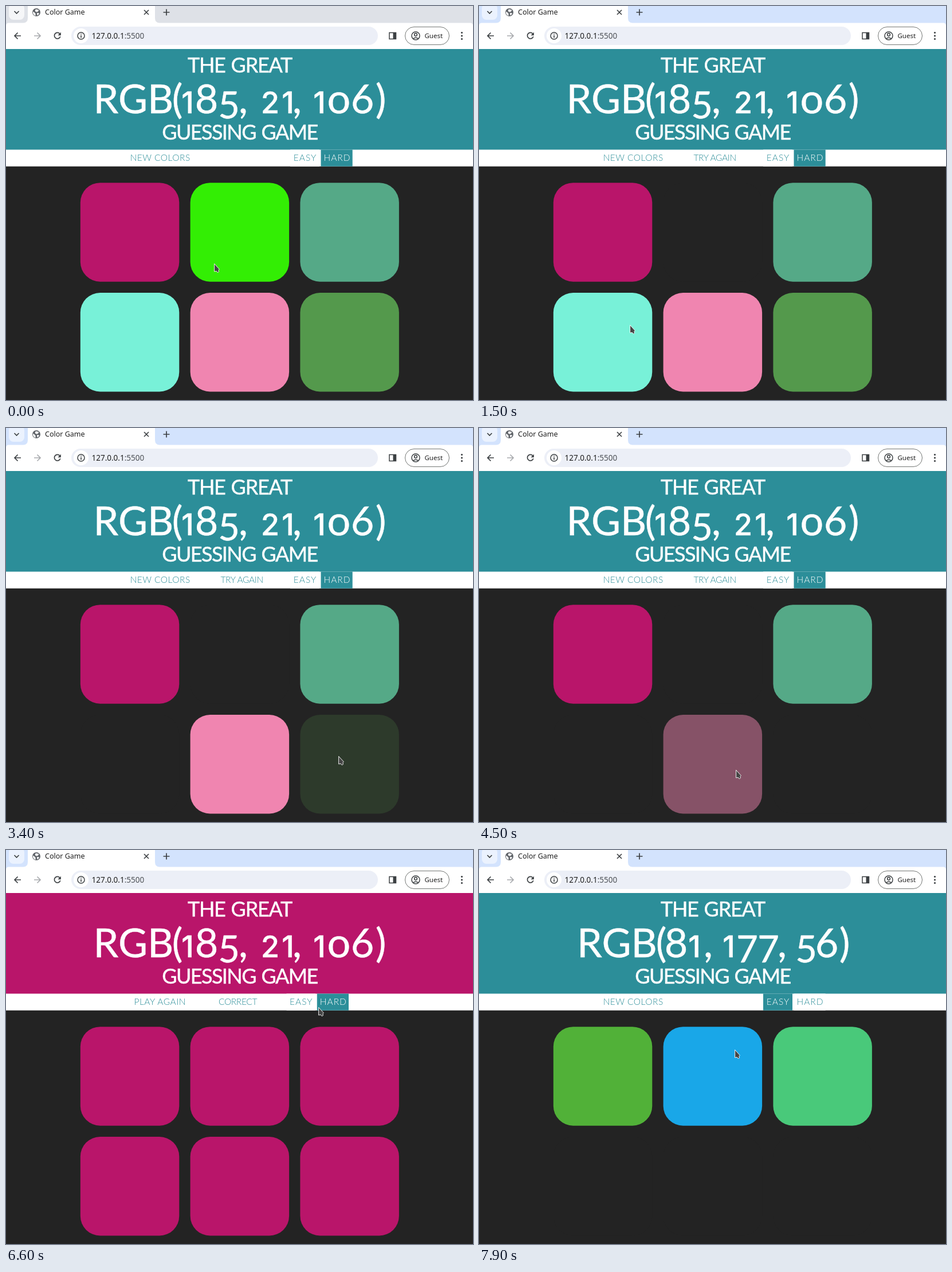
An HTML page for the animation above (8000 ms loop, 815 by 687 pixels).

```html
<!DOCTYPE html>
<html lang="en">
<head>
<meta charset="utf-8">
<title>Color Game</title>
<style>
  :root {
    --t: 0ms;
    --teal: #2c8e99;
    --dark: #232323;
    --win: rgb(185, 21, 106);
  }
  html, body { margin: 0; width: 100%; height: 100%; overflow: hidden; background: var(--dark); }
  svg { display: block; width: 815px; height: 687px; }
  text { font-family: "Noto Sans", "Open Sans", sans-serif; fill: #1f1f1f; white-space: pre; }

  /* Every animation is paused and placed by the shared clock in --t. */
  .a { animation: 8s step-end var(--t) infinite paused; }

  .head text, .nav text { font-family: Lato, "Open Sans", sans-serif; text-anchor: middle; }
  .head text { fill: #fff; stroke: #fff; stroke-width: .5; font-size: 36px; }
  .head .big { font-size: 70px; }
  .head .low { font: 500 52px Inter, "Open Sans", sans-serif; }
  .head .drop { font-size: 65px; }
  .head .round { font-size: 72px; }
  .nav text { fill: var(--teal); font-size: 15.5px; font-weight: 300; letter-spacing: .5px; }
  .nav .msg { letter-spacing: -.35px; }
  .nav .modes text { letter-spacing: 1px; }
  .icon { fill: none; stroke: #3c4043; stroke-width: 1.7; }

  .strip { animation-name: strip; }
  .chip { animation-name: chip; }
  .banner { animation-name: banner; }
  .first { animation-name: first; }
  .second { animation-name: second; }
  .idle { animation-name: idle; }
  .retry { animation-name: retry; }
  .won { animation-name: won; }
  .modes { animation-name: modes; }
  .easy { animation-name: easy; }
  .easyText { animation-name: easyText; }
  .hard { animation-name: hard; }
  .hardText { animation-name: hardText; }
  .pointer { animation-name: pointer; animation-timing-function: ease-in-out; }

  @keyframes strip { 0% { fill: #dee1e7 } 6.25%, to { fill: #d3e3fd } }
  @keyframes chip { 0% { fill: #f5f6f8 } 6.25%, to { fill: #ebf2fe } }
  @keyframes banner { 0%, 89.375%, to { fill: var(--teal) } 68.1125% { fill: var(--win) } }
  @keyframes first { 0% { opacity: 1 } 89.375%, to { opacity: 0 } }
  @keyframes second { 0% { opacity: 0 } 89.375%, to { opacity: 1 } }
  @keyframes idle { 0%, 89.375%, to { opacity: 1 } 68.1125% { opacity: 0 } }
  @keyframes retry { 0%, 68.1125%, to { opacity: 0 } 8.0625% { opacity: 1 } }
  @keyframes won { 0%, 89.375%, to { opacity: 0 } 68.1125% { opacity: 1 } }
  @keyframes modes {
    0%, 89.375%, to { transform: none }
    68.1125% { transform: translateX(-6.7px) }
  }
  @keyframes easy {
    0% { fill: #fff }
    85.5% { fill: #fff; animation-timing-function: ease }
    89.25%, to { fill: var(--teal) }
  }
  @keyframes easyText {
    0% { fill: var(--teal) }
    85.5% { fill: var(--teal); animation-timing-function: ease }
    89.25%, to { fill: #fff }
  }
  @keyframes hard {
    0% { fill: var(--teal) }
    89.375% { fill: var(--teal); animation-timing-function: ease }
    93.125%, to { fill: #fff }
  }
  @keyframes hardText {
    0% { fill: #fff }
    89.375% { fill: #fff; animation-timing-function: ease }
    93.125%, to { fill: var(--teal) }
  }

  /* Tiles: a wrong pick fades out, a right one floods all six. */
  .tile1 { --c: var(--win); --next: rgb(81, 177, 56); animation-name: tile1; }
  .tile2 { --c: #33ee04; --next: #19a7e8; animation-name: tile2; }
  .tile3 { --c: #55a987; --next: #49c97a; animation-name: tile3; }
  .tile4 { --c: #78f1d8; animation-name: tile4; }
  .tile5 { --c: #f085b0; animation-name: tile5; }
  .tile6 { --c: #54994c; animation-name: tile6; }
  @keyframes tile1 {
    0% { fill: var(--c) }
    89.375% { fill: var(--c); animation-timing-function: ease }
    95.625%, to { fill: var(--next) }
  }
  @keyframes tile2 {
    0% { fill: var(--c) }
    8.0625% { fill: var(--c); animation-timing-function: ease }
    14.3125% { fill: var(--dark) }
    68.1125% { fill: var(--dark); animation-timing-function: ease }
    74.3625% { fill: var(--win) }
    89.375% { fill: var(--win); animation-timing-function: ease }
    95.625%, to { fill: var(--next) }
  }
  @keyframes tile3 {
    0% { fill: var(--c) }
    68.1125% { fill: var(--c); animation-timing-function: ease }
    74.3625% { fill: var(--win) }
    89.375% { fill: var(--win); animation-timing-function: ease }
    95.625%, to { fill: var(--next) }
  }
  @keyframes tile4 {
    0% { fill: var(--c) }
    21.875% { fill: var(--c); animation-timing-function: ease }
    28.125% { fill: var(--dark) }
    68.1125% { fill: var(--dark); animation-timing-function: ease }
    74.3625% { fill: var(--win) }
    89.375%, to { fill: var(--dark) }
  }
  @keyframes tile5 {
    0% { fill: var(--c) }
    54.3625% { fill: var(--c); animation-timing-function: ease }
    60.6125% { fill: var(--dark) }
    68.1125% { fill: var(--dark); animation-timing-function: ease }
    74.3625% { fill: var(--win) }
    89.375%, to { fill: var(--dark) }
  }
  @keyframes tile6 {
    0% { fill: var(--c) }
    39.375% { fill: var(--c); animation-timing-function: ease }
    45.625% { fill: var(--dark) }
    68.1125% { fill: var(--dark); animation-timing-function: ease }
    74.3625% { fill: var(--win) }
    89.375%, to { fill: var(--dark) }
  }

  @keyframes pointer {
    0% { transform: translate(364px, 450px) }
    2.5%, 12.5% { transform: translate(379px, 432px) }
    18.75%, 25% { transform: translate(264px, 557px) }
    30%, 47.5% { transform: translate(581px, 573px) }
    52.5%, 57.5% { transform: translate(449px, 597px) }
    65% { transform: translate(260px, 430px) }
    66.25%, 77.5% { transform: translate(236px, 425px) }
    82.5% { transform: translate(546px, 275px) }
    87.5%, 92.5% { transform: translate(515px, 265px) }
    98.75%, to { transform: translate(447px, 349px) }
  }
</style>
</head>
<body>
<svg viewBox="0 0 815 687">
  <rect width="815" height="687" fill="#232323"/>

  <!-- browser frame -->
  <rect class="a strip" width="815" height="36"/>
  <path d="M0 75V34.500Q0 29.500 5 29.500H30Q38 29.500 38 21V0H260V21Q260 29.500 268 29.500H810Q815 29.500 815 34.500V75Z" fill="#fff"/>
  <rect class="a chip" x="5" y="-4" width="27" height="28" rx="8"/>
  <path class="icon" d="M14.500 9l4 4 4-4"/>
  <circle cx="53" cy="11" r="7" fill="#5f6368"/>
  <path d="M47.500 9.500l4 3.500v4q-4-1.500-4.500-5zM52 5.500l5.500 1.500-2 3-3 .5-2-2zM54 12l4 .5q-.5 3-3.500 4z" fill="#fff"/>
  <text x="68" y="15" font-size="12.5">Color Game</text>
  <path class="icon" d="M241 7l8 8m0-8l-8 8M274.500 11h11m-5.500-5.500v11"/>

  <path class="icon" d="M26 52H15.500m5-5.500l-5.500 5.500 5.500 5.500"/>
  <path class="icon" d="M49 52h10.500m-5-5.500l5.500 5.500-5.500 5.500" style="stroke:#a9abae"/>
  <path class="icon" d="M94 48.500a5.300 5.300 0 1 0 .8 4.800"/>
  <path d="M95.800 45.800v5.400h-5.400z" fill="#3c4043"/>
  <rect x="114" y="36" width="535" height="32" rx="16" fill="#eceff7"/>
  <circle cx="131" cy="52" r="13" fill="#fff"/>
  <circle class="icon" cx="131" cy="52" r="6" style="stroke-width:1.5"/>
  <path class="icon" d="M131 51v4.500m0-7.300v1.600" style="stroke-width:1.6"/>
  <text x="149.500" y="57" font-size="13.5">127.0.0.1<tspan fill="#4d5156">:5500</tspan></text>
  <rect class="icon" x="669" y="46.500" width="11.500" height="11" style="stroke-width:1.5"/>
  <rect x="675.500" y="46.500" width="5" height="11" fill="#3c4043"/>
  <rect x="696.500" y="36.500" width="77" height="31" rx="15.500" fill="#fff" stroke="#747775"/>
  <g class="icon" style="stroke-width:1.5">
    <circle cx="715" cy="52" r="7"/>
    <circle cx="715" cy="50" r="2.400"/>
    <path d="M710.500 57q4.500-3.600 9 0"/>
  </g>
  <text x="730.500" y="56" font-size="11.500" font-weight="500">Guest</text>
  <g fill="#3c4043">
    <circle cx="795.500" cy="46.500" r="1.600"/>
    <circle cx="795.500" cy="52" r="1.600"/>
    <circle cx="795.500" cy="57.500" r="1.600"/>
  </g>

  <!-- page -->
  <rect class="a banner" y="75" width="815" height="176"/>
  <g class="head">
    <text x="408" y="116" letter-spacing="-1.25" word-spacing="2">THE GREAT</text>
    <g id="first" class="a first" aria-label="RGB(185, 21, 106)"></g>
    <g id="second" class="a second" aria-label="RGB(81, 177, 56)"></g>
    <text x="408" y="233" letter-spacing="-1.6" word-spacing="2">GUESSING GAME</text>
  </g>
  <rect y="250.500" width="815" height="29.200" fill="#fff"/>
  <g class="nav">
    <text class="a idle" x="269.200" y="270">NEW COLORS</text>
    <text class="a retry msg" x="411.700" y="270">TRY AGAIN</text>
    <text class="a won" x="268.800" y="270">PLAY AGAIN</text>
    <text class="a won msg" x="404.500" y="270">CORRECT</text>
    <g class="a modes">
      <rect class="a easy" x="496" y="250.500" width="51" height="29.200"/>
      <rect class="a hard" x="549.500" y="250.500" width="55.200" height="29.200"/>
      <text class="a easyText" x="522" y="270">EASY</text>
      <text class="a hardText" x="578" y="270">HARD</text>
    </g>
  </g>
  <g id="tiles"></g>
  <path class="a pointer" d="M-.4-.6V13L3.200 12.200 5.500 15 7.500 13 6.800 10.700 8.400 9Z" fill="#454545" stroke="#fff" stroke-width=".9" stroke-linejoin="round"/>
</svg>
<script>
  const root = document.documentElement;
  const byId = id => document.getElementById(id);

  function add(parent, tag, attrs, text = "") {
    const el = document.createElementNS("http://www.w3.org/2000/svg", tag);
    for (const key in attrs) el.setAttribute(key, attrs[key]);
    el.textContent = text;
    parent.append(el);
  }

  // Old-style figures: 0-2 sit at x-height, 5 and 7 hang below the line.
  function figure(ch) {
    if ("12".includes(ch)) return ["low", 187];
    if (ch === "o") return ["round", 187];
    if ("57".includes(ch)) return ["drop", 196];
    return ["big", 187];
  }

  function title(id, parts) {
    for (const [text, x] of parts) {
      const [kind, y] = figure(text);
      add(byId(id), "text", { class: kind, x, y }, text);
    }
  }

  title("first", [["RGB", 222.5], ["(", 299], ["1", 317], ["8", 350], ["5", 389], [",", 414],
    ["2", 461], ["1", 492], [",", 508], ["1", 547], ["o", 581], ["6", 622], [")", 654]]);
  title("second", [["RGB", 241], ["(", 318], ["8", 344], ["1", 376], [",", 400],
    ["1", 436], ["7", 468], ["7", 505], [",", 529], ["5", 571], ["6", 607], [")", 638]]);

  for (let i = 0; i < 6; i++) {
    add(byId("tiles"), "rect", {
      class: `a tile${i + 1}`,
      x: 129.8 + (i % 3) * 191.8,
      y: 308.2 + Math.floor(i / 3) * 191.8,
      width: 172.5, height: 172.5, rx: 34.5
    });
  }

  function tick() {
    const step = Math.floor(performance.now() % 8000 / 100);
    root.style.setProperty("--t", `${-100 * step}ms`);
    requestAnimationFrame(tick);
  }
  tick();
</script>
</body>
</html>
```
